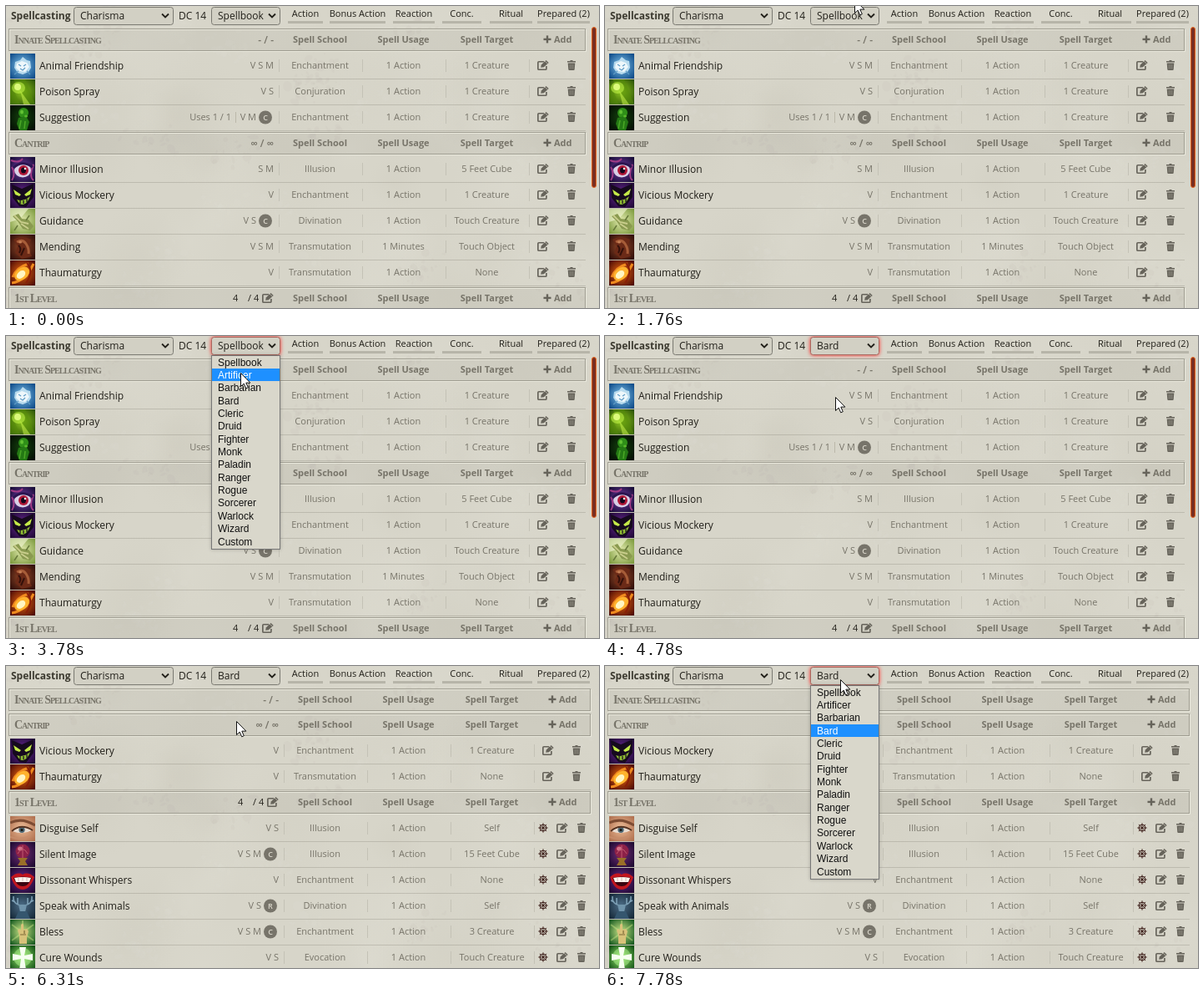
Animation of 711x362 px, one loop 8 s. Source, as an HTML page with a canvas:

```html
<!DOCTYPE html>
<html lang="en">
<head>
<meta charset="utf-8">
<title>Spell list filter</title>
<style>
html, body { margin: 0; width: 100%; height: 100%; overflow: hidden; background: #d7d5c9; }
canvas { display: block; width: 711px; height: 362px; }
</style>
</head>
<body>
<canvas id="stage" width="711" height="362"></canvas>
<script>
const W = 711, H = 362, LOOP = 8000, STEP = 70, OPTION_H = 15.36, LIST_TOP = 23;
const INK = '#211f19', MUTED = '#777469', ICON = '#66635a';
const SANS = '"Open Sans", sans-serif', ARIAL = '"Liberation Sans", Arial, sans-serif';
const TITLE = 'small-caps bold 14px "Liberation Serif", serif';
const stage = document.getElementById('stage').getContext('2d');
let g = stage;

// Drawing helpers
function text(str, x, y, { size = 11, color = MUTED, align = 'left', weight = 400, font, tracking = 0 } = {}) {
  g.font = font || `${weight} ${size}px ${SANS}`;
  g.letterSpacing = `${tracking}px`;
  g.fillStyle = color;
  g.textAlign = align;
  g.fillText(str, x, y);
}
function rect(x, y, w, h, color) {
  g.fillStyle = color;
  g.fillRect(x, y, w, h);
}
function blob(x, y, rx, ry, color, angle = 0) {
  g.beginPath();
  g.ellipse(x, y, rx, ry, angle, 0, 7);
  g.fillStyle = color;
  g.fill();
}
function shape(d, color) {
  g.fillStyle = color;
  g.fill(new Path2D(d));
}
function line(d, color, width = 1) {
  g.strokeStyle = color;
  g.lineWidth = width;
  g.stroke(new Path2D(d));
}
function at(x, y, draw) {
  g.save();
  g.translate(x, y);
  draw();
  g.restore();
}
function layer(draw) {
  const c = document.createElement('canvas');
  c.width = W;
  c.height = H;
  g = c.getContext('2d');
  draw();
  g = stage;
  return c;
}
function seeded(seed) {
  return () => (seed = seed * 16807 % 2147483647) / 2147483647;
}

// Weathered parchment
function paper() {
  const rnd = seeded(4711);
  rect(0, 0, W, H, '#d7d5c9');
  for (let i = 0; i < 50; i++) {
    const x = rnd() * W, y = rnd() * H, r = 25 + rnd() * 60;
    const tone = rnd() < 0.55 ? '230,229,220' : '195,192,178';
    const fade = g.createRadialGradient(x, y, 0, x, y, r);
    fade.addColorStop(0, `rgba(${tone},.14)`);
    fade.addColorStop(1, `rgba(${tone},0)`);
    rect(x - r, y - r, 2 * r, 2 * r, fade);
  }
  for (let i = 0; i < 30; i++) {
    const x = rnd() * W, y = rnd() * H, tone = rnd() < 0.6 ? '226,225,216' : '190,188,176';
    for (let k = 0; k < 26; k++) {
      const r = 0.6 + rnd() * rnd() * 7;
      blob(x + (rnd() + rnd() - 1) * 38, y + (rnd() + rnd() - 1) * 26,
        r, r * (0.4 + rnd() * 0.6), `rgba(${tone},.13)`, rnd() * 3);
    }
  }
}

// Spell pictures: centre tone, edge tone, details on a 30 x 30 tile
const pictures = {
  frost: ['#74b6e0', '#0d4a88', () => {
    shape('M6 10L12 8 15 4 20 8 24 9 25 17 22 22 15 25 9 23 5 17Z', '#b8dbee');
    shape('M8 12L14 9 20 11 23 16 18 22 11 21 7 17Z', '#eef7fb');
    line('M10 13l3 2M19 13l-3 2M12 18l3 2 3-3M5 25l5-4M24 25l-4-4', '#5f9cc6', 1.2);
  }],
  spray: ['#86bf1c', '#2c5207', () => {
    shape('M4 0L18 0 30 30H22ZM0 4L12 30H0Z', 'rgba(85,140,10,.55)');
    blob(10, 10, 8, 7, 'rgba(190,240,70,.6)');
    blob(9, 9, 4, 4, '#dcfa7a');
    shape('M12 13L24 30H16Z', 'rgba(190,235,70,.6)');
  }],
  lure: ['#123d0c', '#030d03', () => {
    blob(16, 9, 6, 6, '#2f9018');
    shape('M10 15l9-2 4 7-3 10h-9l-3-8z', '#247914');
    blob(14, 8, 2, 2.5, '#62c233');
    blob(19, 13, 2, 1.5, '#58b72c');
    line('M13 18l-2 10M18 19l-1 9', '#4aa626', 1.6);
  }],
  eye: ['#6a3a9c', '#150b34', () => {
    line('M1 4Q10 8 15 2M2 28Q7 20 2 12M28 28Q22 23 28 9', '#a03c86', 2);
    blob(15, 16, 10, 8.5, '#d9cfe6');
    blob(16, 16, 6, 6, '#b01838');
    blob(16, 16, 3, 3.5, '#12061c');
    blob(18, 14, 1.3, 1.3, '#fff');
    line('M4 13Q14 3 27 12', '#2b1550', 3);
  }],
  grin: ['#64288e', '#1f0735', () => {
    shape('M2 2L14 7 28 1 28 17 19 29 11 28 3 18Z', '#160a1e');
    shape('M4 8l9 6-2 2-5-2zM26 7l-9 7 2 2 5-2z', '#c4ea48');
    shape('M8 20q8 3 16-4-3 9-9 10-4 0-7-6z', '#8fbd33');
    line('M12 21v4M16 21v4M20 19v4', '#1f0e26', 1.3);
  }],
  guide: ['#d9e3a4', '#7c9a3e', () => {
    shape('M0 0H22L12 12 0 16Z', 'rgba(245,248,215,.6)');
    shape('M3 9l7-3 4 6 8 1 6 8-4 5-9-2-6-9z', '#8a9a50');
    line('M5 8l8 8 9 2M13 18l9 6', '#c9cd8c', 1.8);
    line('M19 14l4-6M9 20l-4 6', '#67793a', 1.5);
  }],
  mend: ['#8a4426', '#2e0d09', () => {
    shape('M4 6Q14 0 25 6L22 16 26 26 14 29 6 22 9 14Z', '#6b2a17');
    line('M8 9Q15 5 19 11T22 23', '#a65c38', 3);
    line('M10 13q4 3 1 9M17 16l-4 9', '#34100a', 2);
    blob(12, 9, 2, 1.5, '#c67f55');
  }],
  flare: ['#d95e10', '#4c0a05', () => {
    line('M2 27Q18 25 28 4M3 20Q8 8 22 4', '#f08a1e', 3);
    blob(14, 16, 10, 7, '#ffb32e', -0.7);
    blob(13, 17, 6, 4, '#fff6c4', -0.7);
    line('M20 3Q29 13 19 27', '#8a1f08', 2);
  }],
  face: ['#e6b48f', '#b0704f', () => {
    line('M0 8Q14 1 30 11', '#7d4c33', 3);
    shape('M3 18Q13 9 26 17 15 23 3 18Z', '#e9ddd2');
    blob(14, 16.5, 3.6, 3.4, '#4d6672');
    blob(14, 16.5, 1.5, 1.5, '#15120f');
    line('M2 18Q13 8 27 17', '#53301f', 1.8);
    line('M0 25Q12 29 24 24', '#c68c6b', 2);
  }],
  orb: ['#6a2a70', '#1c0930', () => {
    blob(15, 11, 8.5, 8.5, '#8c2148');
    blob(12, 8, 3, 2.5, '#d27188');
    line('M9 14Q15 3 21 14M15 4V19', '#c05a70');
    shape('M9 19h12l-3 4 3 5H9l3-5z', '#9a6f28');
  }],
  mouth: ['#5f2680', '#1f0730', () => {
    shape('M1 11Q9 4 15 8 21 4 29 11 24 26 15 26 6 26 1 11Z', '#c2161f');
    shape('M4 12Q15 9 26 12 22 22 15 22 8 22 4 12Z', '#3b0510');
    shape('M5 12Q15 10 25 12L23 17H7Z', '#fff3ec');
    line('M10 12v4M15 11v5M20 12v4', '#b9a1a2', 0.7);
  }],
  stag: ['#47667f', '#152838', () => {
    line('M14 14Q3 13 4 3M6 10L2 8M9 12L9 5M16 14Q27 13 26 3M24 10L28 8M21 12V5', '#7fa2b8', 1.5);
    shape('M10 13h10l-2 9-3 5-3-5z', '#6f93aa');
    shape('M10 21h10l4 9H6z', '#35566e');
  }],
  bless: ['#b6d67c', '#14581f', () => {
    line('M15 1V29M2 6L28 25M28 6L2 25', 'rgba(215,240,140,.4)', 2);
    shape('M11 29V19L9 13l2-2 2 2V6q2-2 3 0v6l4-1 2 3-2 8v7z', '#d8c27a');
    line('M12 18h7M17 13v4', '#7e6a38', 1.2);
  }],
  cross: ['#8fdc66', '#0d4d12', () => {
    blob(15, 14, 11, 11, 'rgba(185,250,150,.45)');
    shape('M11 2h8l-2 10 10-2v8l-10-2 2 13h-8l2-13-10 2v-8l10 2z', '#f6fff0');
  }]
};
function picture(name, x, y) {
  const [inner, outer, details] = pictures[name];
  at(x, y, () => {
    g.beginPath();
    g.rect(0, 0, 30, 30);
    g.clip();
    const fade = g.createRadialGradient(14, 14, 2, 15, 15, 20);
    fade.addColorStop(0, inner);
    fade.addColorStop(1, outer);
    rect(0, 0, 30, 30, fade);
    details();
  });
}

// Control icons, centred on their position
const editIcon = (x, y) => at(x, y, () => {
  g.scale(1.12, 1.05);
  line('M1-4H-4.5Q-5.5-4-5.5-3V4Q-5.5 5-4.5 5H2.5Q3.5 5 3.5 4V1', ICON, 1.5);
  shape('M-2.5 2.5L-2-.5 3.2-5.6 6-2.8 .8 2.2Z', ICON);
  line('M2-4.6L5-1.6', '#d0cdbf', 0.7);
});
const trashIcon = (x, y) => at(x, y, () => {
  shape('M-5-5H-2L-1-6H1L2-5H5V-3.4H-5ZM-4.3-2.6H4.3L3.7 5Q3.6 6 2.6 6H-2.6Q-3.6 6-3.7 5Z', ICON);
  line('M-1.9-1V4.5M0-1V4.5M1.9-1V4.5', '#a5a296', 0.6);
});
const wheelIcon = (x, y) => at(x, y, () => {
  const color = '#33130f';
  g.beginPath();
  g.arc(0, 0, 3.8, 0, 7);
  g.strokeStyle = color;
  g.lineWidth = 1.1;
  g.stroke();
  for (let i = 0; i < 4; i++) {
    line('M-5.8 0H5.8', color, 0.8);
    g.rotate(Math.PI / 4);
  }
});

// Page content
const spell = (pic, name, parts, school, target, { badge, uses, usage = '1 Action', wheel } = {}) =>
  ({ pic, name, parts, school, target, badge, uses, usage, wheel });
const charm = 'Enchantment', wheel = true;
const mockery = spell('grin', 'Vicious Mockery', 'V', charm, '1 Creature');
const thaum = spell('flare', 'Thaumaturgy', 'V', 'Transmutation', 'None');

const bookSections = [
  { title: 'Innate Spellcasting', slots: '- / -', spells: [
    spell('frost', 'Animal Friendship', 'V S M', charm, '1 Creature'),
    spell('spray', 'Poison Spray', 'V S', 'Conjuration', '1 Creature'),
    spell('lure', 'Suggestion', 'V M', charm, '1 Creature', { badge: 'C', uses: 'Uses 1 / 1' })] },
  { title: 'Cantrip', slots: '∞ / ∞', spells: [
    spell('eye', 'Minor Illusion', 'S M', 'Illusion', '5 Feet Cube'),
    mockery,
    spell('guide', 'Guidance', 'V S', 'Divination', 'Touch Creature', { badge: 'C' }),
    spell('mend', 'Mending', 'V S M', 'Transmutation', 'Touch Object', { usage: '1 Minutes' }),
    thaum] },
  { title: '1st Level', spells: [] }
];
const bardSections = [
  { title: 'Innate Spellcasting', slots: '- / -', spells: [] },
  { title: 'Cantrip', slots: '∞ / ∞', spells: [mockery, thaum] },
  { title: '1st Level', spells: [
    spell('face', 'Disguise Self', 'V S', 'Illusion', 'Self', { wheel }),
    spell('orb', 'Silent Image', 'V S M', 'Illusion', '15 Feet Cube', { badge: 'C', wheel }),
    spell('mouth', 'Dissonant Whispers', 'V', charm, 'None', { wheel }),
    spell('stag', 'Speak with Animals', 'V S', 'Divination', 'Self', { badge: 'R', wheel }),
    spell('bless', 'Bless', 'V S M', charm, '3 Creature', { badge: 'C', wheel }),
    spell('cross', 'Cure Wounds', 'V S', 'Evocation', 'Touch Creature', { wheel })] }
];
const filters = [['Action', 338, 380], ['Bonus Action', 388, 455], ['Reaction', 464, 514],
  ['Conc.', 523, 570], ['Ritual', 580, 631], ['Prepared (2)', 637, 700]];
const options = ['Spellbook', 'Artificer', 'Barbarian', 'Bard', 'Cleric', 'Druid', 'Fighter', 'Monk',
  'Paladin', 'Ranger', 'Rogue', 'Sorcerer', 'Warlock', 'Wizard', 'Custom'];

// Grooved box: the dark outline lies one pixel up and left of the light one
function groove(x, y, w, h) {
  rect(x, y, w, h, 'rgba(0,0,0,.045)');
  g.lineWidth = 1;
  g.strokeStyle = '#e9e8dc';
  g.strokeRect(x + 1.5, y + 1.5, w - 2, h - 2);
  g.strokeStyle = '#9f9d91';
  g.strokeRect(x + 0.5, y + 0.5, w - 2, h - 2);
}

function sectionHead({ title, slots }, y, dx) {
  groove(3, y - 13, 693 + dx, 28);
  text(title, 10, y + 5, { font: TITLE, tracking: -1 });
  if (slots) {
    text(slots, 321 + dx, y + 5, { size: 12, weight: 600, align: 'right' });
  } else {
    text('4', 272 + dx, y + 4, { color: INK });
    text('/ 4', 290 + dx, y + 4, { color: INK });
    editIcon(314 + dx, y);
  }
  const bold = { weight: 700, align: 'center' };
  text('Spell School', 376.5 + dx, y + 4, bold);
  text('Spell Usage', 476.5 + dx, y + 4, bold);
  text('Spell Target', 576.5 + dx, y + 4, bold);
  rect(644.5 + dx, y - 1.3, 9, 2.4, ICON);
  rect(647.8 + dx, y - 4.6, 2.4, 9, ICON);
  text('Add', 657 + dx, y + 4, { weight: 700 });
}

function spellRow(s, y, dx) {
  picture(s.pic, 5, y - 14);
  text(s.name, 40, y + 5, { size: 12, color: INK });
  const end = (s.badge ? 300 : 321) + dx;
  text(s.parts, end, y + 4, { align: 'right' });
  if (s.uses) {
    text(s.uses, 270 + dx, y + 4, { align: 'right' });
    rect(275 + dx, y - 6, 1, 13, '#bbb8aa');
  }
  if (s.badge) {
    blob(311 + dx, y + 0.5, 8, 8, '#77746a');
    text(s.badge, 311 + dx, y + 4, { size: 9, weight: 600, color: '#dad7cb', align: 'center' });
  }
  text(s.school, 376.5 + dx, y + 4, { align: 'center' });
  text(s.usage, 476.5 + dx, y + 4, { align: 'center' });
  text(s.target, 576.5 + dx, y + 4, { align: 'center' });
  for (const x of [327, 427, 527, 627]) rect(x + dx, y - 7, 1, 15, '#c4c2b6');
  if (s.wheel) wheelIcon(638 + dx, y);
  editIcon((s.wheel ? 661 : 644) + dx, y);
  trashIcon((s.wheel ? 684 : 678) + dx, y);
  rect(5, y + 16, 690 + dx, 1, 'rgba(135,132,118,.32)');
}

function selectBox(x, w, label, focus) {
  g.beginPath();
  g.roundRect(x + 0.5, 1.5, w - 1, 21, 3);
  g.save();
  if (focus) {
    g.shadowColor = '#f00';
    g.shadowBlur = 5;
  }
  g.fillStyle = '#d2d0c4';
  g.fill();
  g.restore();
  g.strokeStyle = focus ? '#a8685f' : '#7a7971';
  g.lineWidth = 1;
  g.stroke();
  text(label, x + 8, 16, { size: 12, color: INK });
  line(`M${x + w - 14} 9.5l4 4 4-4`, INK, 1.8);
}

function page(sections, dx) {
  paper();
  text('Spellcasting', 6, 16, { size: 12, weight: 700, color: '#3b392f' });
  selectBox(81, 120, 'Charisma');
  text('DC 14', 207, 16, { size: 12, color: INK });
  for (const [label, x1, x2] of filters) {
    text(label, (x1 + x2) / 2, 13, { color: INK, align: 'center' });
    rect(x1, 18, x2 - x1, 3, '#b7b5a9');
  }
  let y = 40;
  for (const section of sections) {
    sectionHead(section, y, dx);
    for (const s of section.spells) spellRow(s, y += 31, dx);
    y += section.spells.length ? 31 : 30;
  }
  if (!dx) {
    g.beginPath();
    g.roundRect(702.5, 25.5, 5, 192, 2.5);
    g.fillStyle = '#782e22';
    g.fill();
    g.strokeStyle = '#e8641c';
    g.lineWidth = 1;
    g.stroke();
  }
}

// Interaction
const route = [[920, 326, 335], [1200, 307, 128], [1690, 303, 4], [1760, 299, -8], [1890, 299, -8],
  [2030, 288, 18], [2160, 284, 11], [3500, 284, 11], [3780, 281, 44], [3920, 278, 64], [4110, 278, 64],
  [4250, 276, 73], [6240, 276, 73], [6310, 276, 66], [6650, 282, 16]];

function pointer(t) {
  const i = route.findLastIndex(k => k[0] <= t);
  if (i < 0) return null;
  const [t0, x0, y0] = route[i], [t1, x1, y1] = route[i + 1] || [LOOP, x0, y0];
  const p = Math.floor((t - t0) / STEP) * STEP / (t1 - t0);
  return { x: Math.round(x0 + (x1 - x0) * p), y: Math.round(y0 + (y1 - y0) * p) };
}
const during = (t, a, b) => t >= a && t < b;

function dropdown(active) {
  g.save();
  g.shadowColor = 'rgba(0,0,0,.25)';
  g.shadowBlur = 4;
  rect(246, LIST_TOP, 83, 233, '#777');
  g.restore();
  rect(247, LIST_TOP + 1, 81, 231, '#d9d7cb');
  options.forEach((name, i) => {
    const y = Math.round(LIST_TOP + 0.5 + i * OPTION_H);
    if (i === active) rect(247, y, 81, 15, '#1e90ff');
    text(name, 254, y + 11.5, { font: `12px ${ARIAL}`, color: i === active ? '#fff' : '#111' });
  });
}
function drawPointer({ x, y }, hand) {
  at(x + 0.5, y + 0.5, () => {
    const d = hand
      ? 'M-1 1Q1-1 3 1V8Q5 6 6.5 8 8.5 7 9.5 9 12 8 12 11V16L10 22H1L-5 14Q-6 10-3 11L-1 13Z'
      : 'M0 0V16L3.7 12.6 6.2 18.3 8.8 17.2 6.3 11.6H11.4Z';
    shape(d, '#fff');
    line(d, '#111');
    if (hand) line('M3 8V12M6.5 8V12M9.5 9V12', '#111', 0.9);
  });
}

const bookPage = layer(() => page(bookSections, 0));
const bardPage = layer(() => page(bardSections, 6));

function frame(now) {
  const t = now % LOOP, pos = pointer(t), onBook = t < 5040;
  const selected = t < 4780 ? 0 : 3;
  g.drawImage(onBook ? bookPage : bardPage, 0, 0);
  selectBox(246, 83, options[selected], during(t, 2750, 5040) || t >= 7710);
  if (during(t, 2750, 4780) || t >= 7710) {
    dropdown(pos.y > LIST_TOP ? Math.floor((pos.y - LIST_TOP) / OPTION_H) : selected);
  }
  if (pos) {
    const click = during(t, 2690, 2820) || during(t, 4580, 4780) || during(t, 7640, 7780);
    if (click) blob(pos.x, pos.y, 12, 12, 'rgba(255,255,0,.45)');
    drawPointer(pos, onBook && Math.hypot(pos.x - 311, pos.y - 133) < 10);
  }
}
const start = performance.now();
function tick() {
  frame(performance.now() - start);
  requestAnimationFrame(tick);
}
tick();
</script>
</body>
</html>
```
